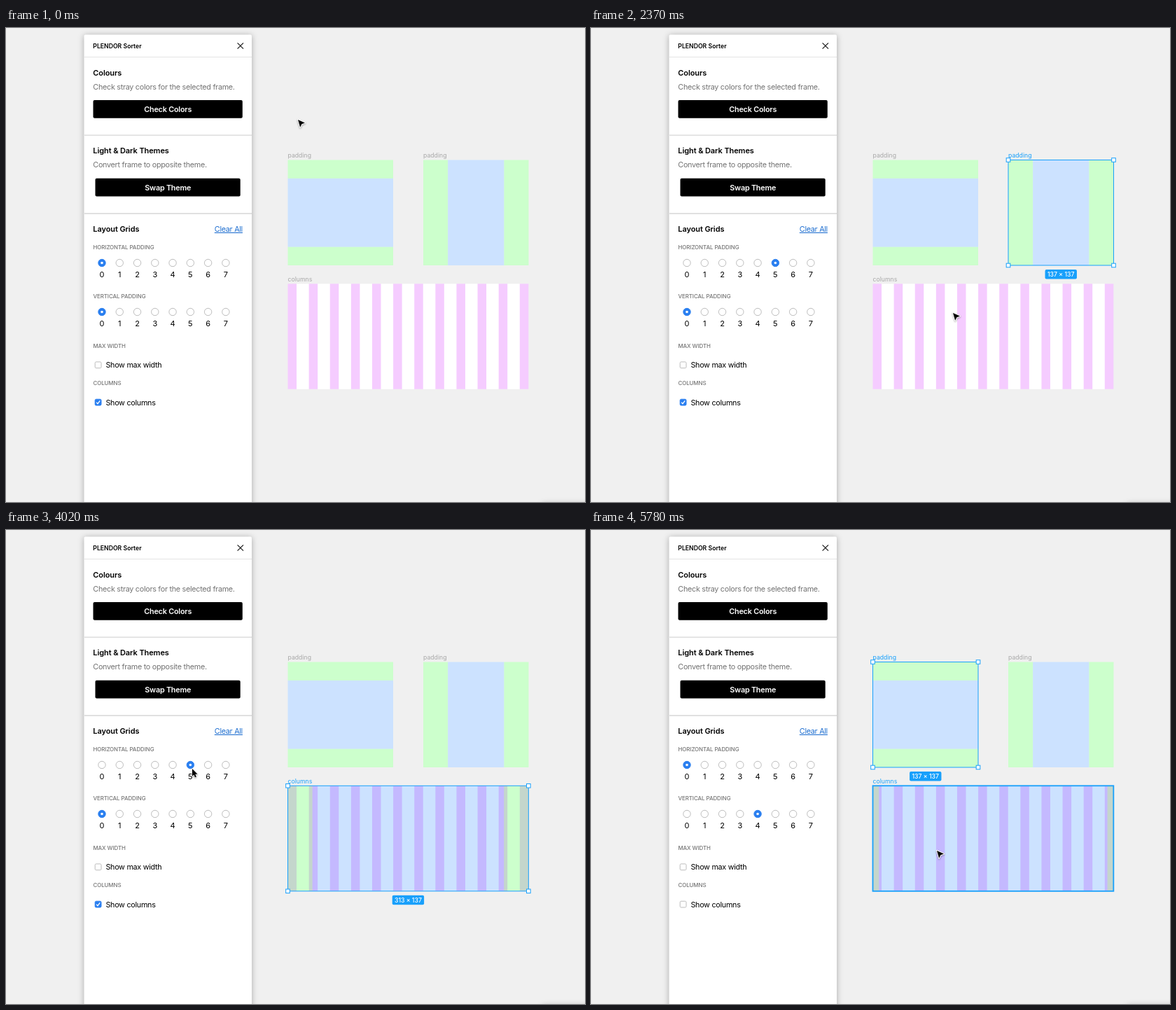
An HTML page that plays this animation: 827 px wide and 677 px high, repeating every 5.94 s.

```html
<!DOCTYPE html>
<html lang="en">
<head>
<meta charset="utf-8">
<title>Layout grid panel</title>
<style>
  html, body { margin: 0; width: 100%; height: 100%; overflow: hidden; background: #f0f0f0; }
  svg { display: block; width: 827px; height: 677px; }
  text { font-family: Inter, "Open Sans", sans-serif; font-size: 10.8px; letter-spacing: -.288px; fill: #000; white-space: pre; }
  .shade { fill: #fff; filter: drop-shadow(0 1px 4px rgba(0, 0, 0, .3)); }
  .title { font-size: 8.7px; font-weight: 600; letter-spacing: 0; }
  .head { font-size: 11px; font-weight: 600; letter-spacing: -.09px; }
  .note { fill: #737373; }
  .link { fill: #1f6fd0; text-decoration: underline; }
  .caps { font-size: 7.9px; font-weight: 500; letter-spacing: -.05px; fill: #757575; }
  .btn { fill: #fff; font-weight: 600; letter-spacing: -.2px; text-anchor: middle; }
  .num { font-size: 11px; letter-spacing: 0; text-anchor: middle; }
  .tag { font-size: 8.7px; letter-spacing: 0; fill: #a8a8a8; }
  .size { font-size: 8.7px; font-weight: 500; letter-spacing: 0; fill: #fff; text-anchor: middle; }
  .box { fill: #fff; stroke: #bcbcbc; }
  .dot, .tick, .outline, .handles { visibility: hidden; }
  .dot { fill: #fff; }
  .tick { fill: none; stroke: #fff; stroke-width: 1.3; }
  .on > .box { fill: #2a7ff0; stroke: #2a7ff0; }
  .on > .dot, .on > .tick { visibility: visible; }
  .press > .box { fill: #e6e6e6; }
  .outline { fill: none; stroke: #18a0fb; }
  .over > .outline { visibility: visible; stroke-width: 1.8; }
  .sel > .outline, .sel > .handles { visibility: visible; }
  .over > .tag, .sel > .tag { fill: #18a0fb; }
  .handles > .knob { fill: #fff; stroke: #18a0fb; }
  .pointer { fill: #000; stroke: #fff; stroke-linejoin: round; paint-order: stroke; filter: drop-shadow(0 1px 1px rgba(0, 0, 0, .35)); }
</style>
</head>
<body>
<svg viewBox="0 0 827 677">
  <rect width="827" height="677" fill="#f0f0f0"/>
  <rect class="shade" x="766" y="679" width="90" height="20"/>
  <g id="canvas"></g>
  <rect class="shade" x="111.5" y="9.5" width="239.5" height="690" rx="2"/>
  <path d="M112 41.5H351" stroke="#e4e4e4"/>
  <path d="M112 153.2H351M112 265H351" stroke="#d6d6d6" stroke-width="1.3"/>
  <text class="title" x="124.3" y="28.6">PLENDOR Sorter</text>
  <path d="M330.6 21.3l8.4 8.4m0-8.4l-8.4 8.4" stroke="#111" stroke-width="1.1"/>
  <text class="head" x="124.3" y="67.5">Colours</text>
  <text class="note" x="124.3" y="87.7">Check stray colors for the selected frame.</text>
  <rect x="124.5" y="103" width="213.3" height="25.7" rx="2"/>
  <text class="btn" x="231.2" y="120.4">Check Colors</text>
  <text class="head" x="124.3" y="179.2">Light &amp; Dark Themes</text>
  <text class="note" x="124.3" y="199.3">Convert frame to opposite theme.</text>
  <rect x="127.5" y="214.7" width="207.2" height="25.7" rx="2"/>
  <text class="btn" x="231.2" y="232">Swap Theme</text>
  <text class="head" x="124.3" y="290.9">Layout Grids</text>
  <text class="link" x="297.8" y="290.9">Clear All</text>
  <text class="caps" x="124.4" y="316.4">HORIZONTAL PADDING</text>
  <text class="caps" x="124.4" y="386.4">VERTICAL PADDING</text>
  <text class="caps" x="124.4" y="456.6">MAX WIDTH</text>
  <text class="caps" x="124.4" y="510">COLUMNS</text>
  <g id="panel"></g>
  <g id="cursor">
    <path class="pointer" id="move" stroke-width="2" d="M0 0L10 4.6 5.4 6.2 3.2 10.8Z"/>
    <path class="pointer" id="arrow" stroke-width="1.2" d="M0 0V10.7L2.4 8.5 4 12.3 5.9 11.5 4.3 7.8H7.6Z"/>
  </g>
</svg>
<script>
const LOOP = 5940;
const UNIT = 1.0985; // canvas zoom
const PADS = [0, 4, 8, 16, 24, 32, 40, 48];
const GREEN = 'rgba(0,255,0,.2)', BLUE = 'rgba(0,110,255,.2)', PINK = 'rgba(204,0,255,.2)';
const $ = id => document.getElementById(id);

function add(parent, tag, attrs = {}, text = '') {
  const el = document.createElementNS('http://www.w3.org/2000/svg', tag);
  for (const k in attrs) el.setAttribute(k, attrs[k]);
  el.textContent = text;
  return parent.appendChild(el);
}
const rect = (parent, x, y, width, height, attrs) => add(parent, 'rect', { x, y, width, height, ...attrs });

function inset(parent, f, px, py) {
  const { x, y, w, h } = f;
  if (px) {
    rect(parent, x, y, px, h, { fill: GREEN });
    rect(parent, x + w - px, y, px, h, { fill: GREEN });
  }
  if (py) {
    rect(parent, x, y, w, py, { fill: GREEN });
    rect(parent, x, y + h - py, w, py, { fill: GREEN });
  }
  rect(parent, x + px, y + py, w - 2 * px, h - 2 * py, { fill: BLUE });
}

function frame(name, x, y, cols, rows) {
  const w = cols * UNIT, h = rows * UNIT;
  const g = add($('canvas'), 'g');
  rect(g, x, y, w, h, { fill: '#fff' });
  const grid = add(g, 'g');
  add(g, 'text', { class: 'tag', x, y: y - 3.3 }, name);
  rect(g, x, y, w, h, { class: 'outline' });
  const marks = add(g, 'g', { class: 'handles' });
  for (const cx of [x, x + w])
    for (const cy of [y, y + h]) rect(marks, cx - 2.8, cy - 2.8, 5.6, 5.6, { class: 'knob' });
  const mid = x + w / 2;
  rect(marks, mid - 22.7, y + h + 6, 45.4, 13.5, { rx: 2, fill: '#18a0fb' });
  add(marks, 'text', { class: 'size', x: mid, y: y + h + 15.9 }, `${cols} × ${rows}`);
  return { g, grid, x, y, w, h };
}

const frames = {
  a: frame('padding', 402.5, 188.5, 137, 137),
  b: frame('padding', 596, 188.5, 137, 137),
  c: frame('columns', 402.5, 365.3, 313, 137)
};
inset(frames.a.grid, frames.a, 0, PADS[4] * UNIT);
inset(frames.b.grid, frames.b, PADS[5] * UNIT, 0);

const { c } = frames;
const gutter = 16 * UNIT, colW = (c.w - 11 * gutter) / 12;
for (let i = 0; i < 12; i++) rect(c.grid, c.x + i * (colW + gutter), c.y, colW, c.h, { fill: PINK });
const padLayers = PADS.map((p, i) => {
  const layer = add(c.grid, 'g');
  if (i) inset(layer, c, p * UNIT, 0);
  return layer;
});

function radios(y) {
  return PADS.map((_, i) => {
    const cx = 137 + i * 25.27;
    const g = add($('panel'), 'g');
    add(g, 'circle', { class: 'box', cx, cy: y, r: 5.2 });
    add(g, 'circle', { class: 'dot', cx, cy: y, r: 1.8 });
    add(g, 'text', { class: 'num', x: cx, y: y + 20 }, i);
    return g;
  });
}
function checkbox(y, label) {
  const g = add($('panel'), 'g');
  rect(g, 127.2, y - 4.4, 8.8, 8.8, { class: 'box', rx: 1.6 });
  add(g, 'path', { class: 'tick', d: `M129.2 ${y + .2}l1.8 1.9 3.2-4.3` });
  add(g, 'text', { x: 142.4, y: y + 4.1 }, label);
  return g;
}
const hRow = radios(335.5), vRow = radios(405.5);
checkbox(481.3, 'Show max width');
const colBox = checkbox(534.6, 'Show columns');

// Each entry changes part of the running state.
const events = [
  [0, { h: 0, v: 0, cols: true, sel: '', over: '', press: -1, pad: 0 }],
  [320, { over: 'a' }],
  [840, { sel: 'a', over: '', v: 4, cols: false }],
  [1430, { over: 'b' }],
  [1740, { sel: 'b', over: '', h: 5, v: 0, cols: true }],
  [2400, { over: 'c' }],
  [2530, { sel: 'c', over: '', h: 0 }],
  [3520, { press: 4 }],
  [3650, { press: -1, h: 4, pad: 4 }],
  [3950, { h: 5, pad: 5 }],
  [4320, { h: 2, pad: 2 }],
  [4910, { over: 'a' }],
  [5210, { sel: 'a', over: '', h: 0, v: 4, cols: false }],
  [5620, { over: 'c' }]
];

// start, end, control point, end point
const moves = [
  [0, 540, 370, 175, 427, 230],
  [840, 990, 437, 232, 447, 232],
  [1160, 1580, 560, 270, 645, 220],
  [2100, 2370, 560, 330, 517, 407],
  [2380, 2460, 516, 411, 517, 413],
  [2720, 2810, 525, 414, 535, 414],
  [2980, 3550, 380, 390, 241, 341],
  [3680, 3900, 254, 339, 266, 341],
  [4040, 4300, 230, 338, 189, 339],
  [4340, 4420, 196, 342, 202, 348],
  [4550, 4670, 203, 360, 207, 367],
  [4770, 4980, 330, 340, 468, 299],
  [5480, 5780, 484, 380, 494, 458]
];

function cursorAt(t) {
  let x = 417, y = 131;
  for (const [t0, t1, cx, cy, ex, ey] of moves) {
    if (t <= t0) break;
    const p = Math.min(1, (t - t0) / (t1 - t0));
    const u = p * p * (3 - 2 * p);
    const mix = (a, b, d) => (1 - u) ** 2 * a + 2 * u * (1 - u) * b + u * u * d;
    x = mix(x, cx, ex);
    y = mix(y, cy, ey);
  }
  return [x, y];
}

const show = (el, yes) => { el.style.display = yes ? '' : 'none'; };

function draw(t) {
  const s = Object.assign({}, ...events.filter(e => e[0] <= t).map(e => e[1]));
  hRow.forEach((g, i) => {
    g.classList.toggle('on', i === s.h);
    g.classList.toggle('press', i === s.press);
  });
  vRow.forEach((g, i) => g.classList.toggle('on', i === s.v));
  colBox.classList.toggle('on', s.cols);
  padLayers.forEach((g, i) => show(g, i === s.pad));
  for (const k in frames) {
    frames[k].g.classList.toggle('sel', s.sel === k);
    frames[k].g.classList.toggle('over', s.over === k);
  }
  const [x, y] = cursorAt(t);
  $('cursor').setAttribute('transform', `translate(${x.toFixed(2)} ${y.toFixed(2)})`);
  show($('arrow'), x < 351);
  show($('move'), x >= 351);
}

const start = performance.now();
function tick() {
  draw((performance.now() - start) % LOOP);
  requestAnimationFrame(tick);
}
tick();
</script>
</body>
</html>
```
